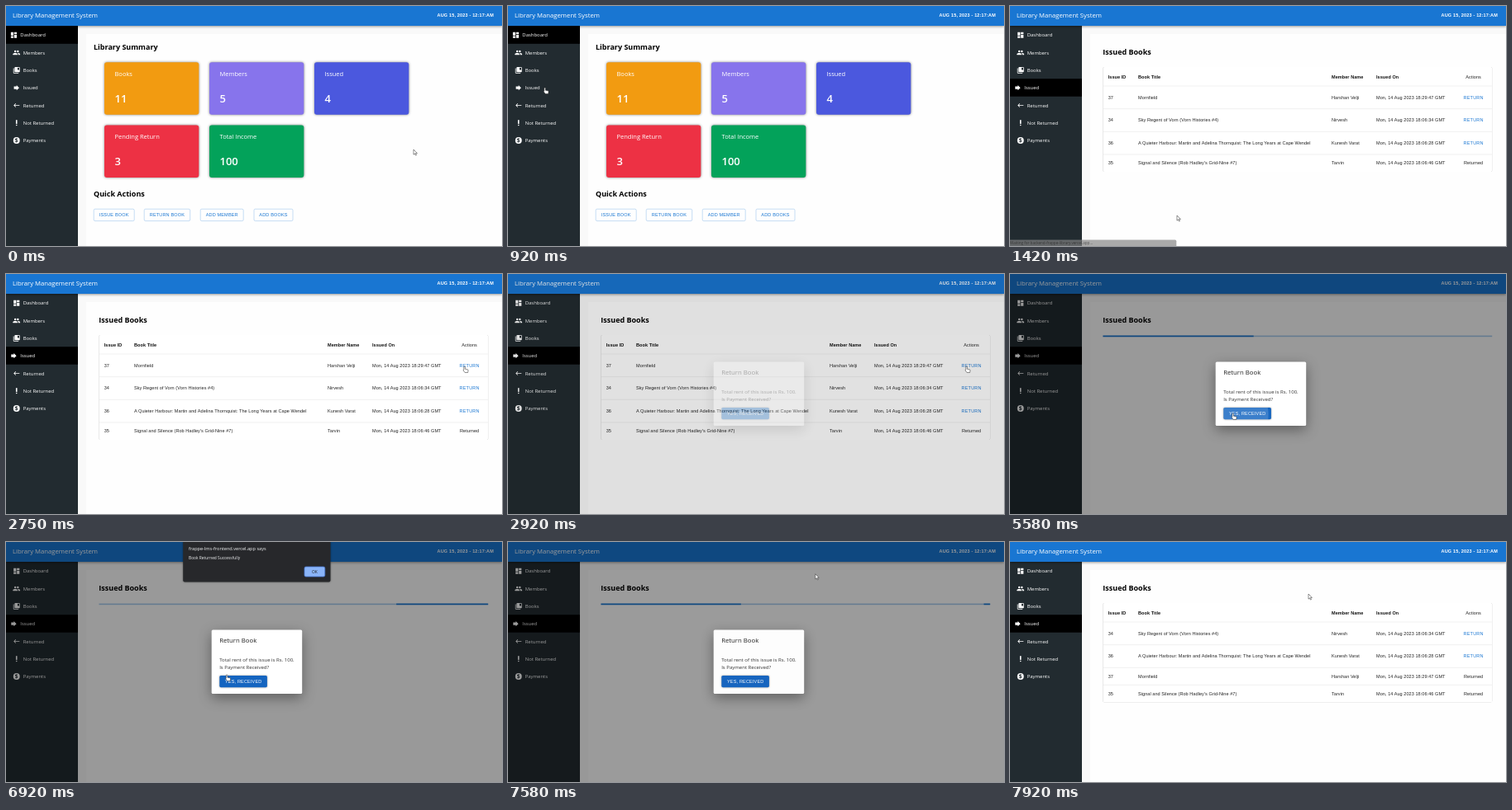
An HTML page for the animation above (8000 ms loop, 600 by 291 pixels).

```html
<!DOCTYPE html>
<html lang="en">
<head>
<meta charset="utf-8">
<title>Library Management System</title>
<style>
  html, body { margin: 0; width: 100%; height: 100%; overflow: hidden; background: #fff; }
  svg { display: block; width: 100vw; height: 100vh; }
  text { font-family: "Open Sans", "Noto Sans", sans-serif; white-space: pre; }
  .ar { font-family: "Liberation Sans", Arial, sans-serif; font-size: 5.54px; letter-spacing: .0107em; }
  .btn { letter-spacing: .0286em; }
  .b { font-weight: 700; }
  .mid { text-anchor: middle; }
  .end { text-anchor: end; }
  .h { font-size: 9px; font-weight: 700; fill: #000; }
  .bar { filter: drop-shadow(0 1px 1.5px rgba(0,0,0,.4)); }
  .card { filter: drop-shadow(0 .6px 1.8px rgba(0,0,0,.5)); }
  .paper { filter: drop-shadow(0 .5px .6px rgba(0,0,0,.35)); }
  .dialog { filter: drop-shadow(0 5px 8px rgba(0,0,0,.38)); }
  .raised { filter: drop-shadow(0 .8px .9px rgba(0,0,0,.4)); }
</style>
</head>
<body>
<svg id="stage" viewBox="0 0 600 291" preserveAspectRatio="none"></svg>
<script>
const LOOP = 8000, FPS = 12;
const OPEN_PAGE = 1000, PAGE_READY = 1330, OPEN_DIALOG = 2850, LOAD = 5365,
      ALERT = 6515, ALERT_OFF = 7480, CLOSE_DIALOG = 7580, RELOADED = 7740;
const BLUE = '#1976d2';

const rect = (x, y, w, h, fill, more = '') =>
  `<rect x="${x}" y="${y}" width="${w}" height="${h}" fill="${fill}" ${more}/>`;
const text = (x, y, s, size, fill, more = '') =>
  `<text x="${x}" y="${y}" ${size ? `font-size="${size}"` : ''} fill="${fill}" ${more}>${s}</text>`;
const arial = (x, y, s, cls = '', fill = '#222') => text(x, y, s, 0, fill, `class="ar ${cls}"`);
const group = (id, body, more = '') => `<g id="${id}" ${more}>${body}</g>`;

// Sidebar
const person = (x) => `<circle cx="${x}" cy="8" r="3"/><path d="M${x - 7} 19v-2.5c0-2.3 4.7-3.5 7-3.5s7 1.2 7 3.5V19z"/>`;
const menu = [
  ['Dashboard', '<path d="M3 13h8V3H3zm0 8h8v-6H3zm10 0h8V11h-8zm0-18v6h8V3z"/>'],
  ['Members', person(8) + '<circle cx="16" cy="8" r="3"/><path d="M15 13c1.200.8 2 2 2 3.500V19h6v-2.500c0-2.300-4.700-3.500-8-3.500z"/>'],
  ['Books', '<path d="M4 6H2v14c0 1.100.9 2 2 2h14v-2H4zM20 2H8c-1.100 0-2 .9-2 2v12c0 1.100.9 2 2 2h12c1.100 0 2-.9 2-2V4c0-1.100-.9-2-2-2zm0 10l-2.500-1.500L15 12V4h5z"/>'],
  ['Issued', '<path d="M12 8V4l8 8-8 8v-4H4V8z"/>'],
  ['Returned', '<path d="M21 11H6.800l3.600-3.600L9 6l-6 6 6 6 1.400-1.400L6.800 13H21z"/>'],
  ['Not Returned', '<circle cx="12" cy="19" r="2"/><path d="M10 3h4v12h-4z"/>'],
  ['Payments', '<circle cx="12" cy="12" r="10"/><text x="12" y="18" font-size="17" font-weight="700" fill="#222b30" text-anchor="middle">$</text>']
];
const sidebar = (active) => rect(0, 24, 87, 267, '#222b30') + menu.map(([label, icon], i) => {
  const y = 35.2 + i * 21.3, on = i === active;
  return (on ? rect(0, y - 10.9, 87, 21.5, '#000') : '') +
    `<g fill="#fff" transform="translate(${on ? 4.700 : 8} ${y - 4.700}) scale(.396)">${icon}</g>` +
    text(on ? 17.3 : 20.7, y + 2.2, label, 5.95, '#fff');
}).join('');

// Dashboard page
const cards = [['Books', 11, '#f29b11'], ['Members', 5, '#8774ec'], ['Issued', 4, '#4b58de'],
               ['Pending Return', 3, '#ed3144'], ['Total Income', 100, '#03a25a']];
const actions = [['ISSUE BOOK', 106, 49], ['RETURN BOOK', 167, 55.5], ['ADD MEMBER', 235, 52], ['ADD BOOKS', 299.8, 47]];
const dashboard = text(106, 53, 'Library Summary', 0, '#000', 'class="h"') +
  cards.map(([label, n, fill], i) => {
    const x = 119 + i % 3 * 127, y = 68.3 + Math.floor(i / 3) * 76.3;
    return rect(x, y, 114.3, 63.4, fill, 'rx="3" class="card"') +
      text(x + 12.5, y + 16.5, label, 7.5, '#fff') +
      text(x + 12.5, y + 48.2, n, 13, '#fff', 'font-weight="600"');
  }).join('') +
  text(106, 231, 'Quick Actions', 0, '#000', 'class="h"') +
  actions.map(([label, x, w]) =>
    rect(x + .2, 246.2, w, 14.4, 'none', 'rx="1.6" stroke="#8cbae8" stroke-width=".5"') +
    arial(x + w / 2 + .2, 255.4, label, 'btn mid', BLUE)).join('');

// Issued books page
const books = {
  37: ['Mornfield', 'Harshan Velji', '29:47'],
  34: ['Sky Regent of Vorn (Vorn Histories #4)', 'Nirvesh', '06:34'],
  36: ['A Quieter Harbour: Martin and Adelina Thornquist: The Long Years at Cape Wendel', 'Kunesh Varat', '06:28'],
  35: ['Signal and Silence (Rob Hadley\'s Grid-Nine #7)', 'Tarvin', '06:46']
};
const cols = [118.7, 155, 389, 443];
function table(ids, open) {
  let y = 97, body = '';
  ids.forEach((id, i) => {
    const h = i < open ? 27.65 : 21, base = y + h / 2 + 2;
    const [title, who, at] = books[id];
    body += `<path d="M112.500 ${y}H583" stroke="#e0e0e0" stroke-width=".5"/>`;
    [id, title, who, `Mon, 14 Aug 2023 18:${at} GMT`].forEach((s, c) => body += arial(cols[c], base, s));
    body += i < open ? arial(560.6, base, 'RETURN', 'btn mid', BLUE) : arial(560.6, base, 'Returned', 'mid');
    y += h;
  });
  const head = ['Issue ID', 'Book Title', 'Member Name', 'Issued On']
    .map((s, c) => arial(cols[c], 87.600, s, 'b', '#111')).join('');
  return rect(112.5, 74, 470.7, y - 74, '#fff', 'rx="1.6" class="paper"') + head +
    arial(560.6, 87.6, 'Actions', 'mid') + body;
}
const progress = rect(112.5, 74.6, 470.7, 1.6, '#a7caed') +
  ['p1', 'p2'].map(id => rect(112.5, 74.6, 0, 1.6, BLUE, `id="${id}"`)).join('');
const issued = text(112.3, 59, 'Issued Books', 0, '#000', 'class="h"') +
  group('before', rect(542, 103, 37, 15, BLUE, 'id="hover" opacity=".05" rx="1.6"') + table([37, 34, 36, 35], 3)) +
  group('after', table([34, 36, 37, 35], 2)) +
  group('loading', progress);

// Overlays
const dialog = rect(248.7, 106.5, 109.5, 77.5, '#fff', 'rx="1.6" class="dialog"') +
  text(258.2, 122, 'Return Book', 7.75, '#222') +
  rect(334, 138, 15.3, 9, '#1f5cc6', 'id="mark"') +
  text(258.2, 145.2, 'Total rent of this issue is Rs<tspan id="picked">. 100.</tspan>', 6, '#333') +
  text(258.2, 154.1, 'Is Payment Received?', 6, '#333') +
  rect(258.3, 162, 57.6, 14.2, BLUE, 'rx="1.6" class="raised" id="yes"') +
  '<clipPath id="btnClip"><rect x="258.300" y="162" width="57.600" height="14.200" rx="1.600"/></clipPath>' +
  '<circle id="ripple" cx="271" cy="170" fill="#fff" clip-path="url(#btnClip)"/>' +
  arial(287.2, 171.1, 'YES, RECEIVED', 'btn mid', '#fff');
const alertBox = rect(214.2, -4, 178.3, 52.4, '#27282b', 'rx="2" class="raised"') +
  text(221, 10, 'frappe-lms-frontend.vercel.app says', 5.58, '#f1f3f4') +
  text(221, 21, 'Book Returned Successfully', 4.85, '#f1f3f4') +
  rect(361, 30, 24.8, 12, '#8ab4f8', 'rx="1.8" stroke="#4a78d0" stroke-width=".8"') +
  text(373.4, 37.8, 'OK', 4.9, '#202124', 'class="mid"');
const status = '<path d="M0 283.500H199.500q1.800 0 1.800 1.800V291H0z" fill="#858585" opacity=".8"/>' +
  text(0, 289.4, 'Waiting for backend-frappe-library.vercel.app...', 4.6, '#3a3a3a');

document.getElementById('stage').innerHTML =
  rect(0, 0, 600, 291, '#f9f9f9') + rect(97, 34, 503, 257, '#fefefe') +
  group('home', dashboard + sidebar(0)) +
  group('list', issued + sidebar(3)) +
  rect(0, 0, 600, 24, BLUE, 'class="bar"') +
  text(8, 14.1, 'Library Management System', 7.72, '#fff') +
  arial(590, 13.2, 'AUG 15, 2023 - 12:17:AM', 'b btn end', '#fff') +
  group('status', status) +
  rect(0, 0, 600, 291, '#000', 'id="shade"') +
  group('dialog', dialog) + group('alert', alertBox) +
  group('arrow', '<path d="M0 0V6.200L1.500 4.900 2.500 7.100 3.500 6.700 2.500 4.500H4.400Z"/>', 'fill="#fff" stroke="#222" stroke-width=".5"') +
  group('hand', '<path d="M-.4 0c.5 0 .8.3.8.8v2.400l2.900.6c.6.1.9.5.8 1.100l-.4 2.600H.2L-1.800 5c-.3-.5.2-1 .6-.7V.8c0-.5.300-.8.8-.8z"/>', 'fill="#fff" stroke="#222" stroke-width=".5"');

const el = {};
document.querySelectorAll('[id]').forEach(e => el[e.id] = e);
const show = (id, on) => el[id].setAttribute('display', on ? 'inline' : 'none');
const set = (id, attr, v) => el[id].setAttribute(attr, v);
const clamp = (v) => Math.min(1, Math.max(0, v));
const ramp = (t, a, b) => clamp((t - a) / (b - a));
const smooth = (p) => p * p * (3 - 2 * p);

function bezier(x, x1, y1, x2, y2) {
  const at = (s, a, b) => 3 * (1 - s) * (1 - s) * s * a + 3 * (1 - s) * s * s * b + s * s * s;
  let lo = 0, hi = 1;
  for (let i = 0; i < 24; i++) {
    const m = (lo + hi) / 2;
    if (at(m, x1, x2) < x) lo = m; else hi = m;
  }
  return at(lo, y1, y2);
}

// Two bars chase each other across the track, 2.1 s per round
function placeBar(id, left, right) {
  const a = clamp(left), b = clamp(1 - right);
  set(id, 'x', 112.5 + a * 470.7);
  set(id, 'width', Math.max(0, b - a) * 470.7);
}
function runProgress(ms) {
  const phase = (d) => ms < d ? 0 : clamp((ms - d) % 2100 / 1260);
  const p = bezier(phase(0), .65, .815, .735, .395);
  const q = bezier(phase(1150), .165, .84, .44, 1);
  placeBar('p1', -.35 + 1.35 * p, 1 - 1.9 * p);
  placeBar('p2', -2 + 3.07 * q, 1 - 1.08 * q);
}

const path = [
  [0, 493, 174], [170, 493, 174], [830, 45, 99], [1000, 45, 99], [1420, 202, 254],
  [1670, 330, 186], [2350, 555, 112], [2920, 555, 112], [3420, 335, 143], [3850, 349, 142],
  [4250, 349, 142], [4850, 270, 169], [5750, 270, 169], [6300, 267.5, 161], [6950, 267.5, 161],
  [7330, 373, 36], [7500, 373, 36], [7920, 361, 63], [LOOP, 361, 63]
];
function pointer(t) {
  const i = path.findIndex(k => k[0] > t), a = path[i - 1], b = path[i];
  const p = smooth(ramp(t, a[0], b[0]));
  return [a[1] + (b[1] - a[1]) * p, a[2] + (b[2] - a[2]) * p];
}

function draw(t) {
  const [x, y] = pointer(t);
  const overReturn = t > 2250 && t < 2950, overYes = t > 4740 && t < 7000;
  const hand = x < 80 || overReturn || overYes;
  show('hand', hand);
  show('arrow', !hand);
  set(hand ? 'hand' : 'arrow', 'transform', `translate(${x} ${y})`);

  show('home', t < OPEN_PAGE);
  show('list', t >= OPEN_PAGE);
  const reading = t >= LOAD && t < RELOADED;
  show('before', t >= PAGE_READY && t < LOAD);
  show('after', t >= RELOADED);
  show('loading', t < PAGE_READY || reading);
  show('hover', overReturn);
  // The open alert holds the bars still
  runProgress(t < LOAD ? t - OPEN_PAGE : Math.min(t, ALERT) - LOAD + Math.max(0, t - ALERT_OFF));
  set('status', 'opacity', ramp(t, OPEN_PAGE, 1100) * (1 - ramp(t, 1380, 1640)));

  const open = ramp(t, OPEN_DIALOG, OPEN_DIALOG + 225) - ramp(t, CLOSE_DIALOG, CLOSE_DIALOG + 195);
  set('shade', 'opacity', open * .4);
  set('dialog', 'opacity', open);
  const picked = t >= 3500 && t < 4320;
  show('mark', picked);
  set('mark', 'width', 15.3 * ramp(t, 3420, 3750));
  set('picked', 'fill', picked ? '#fff' : '#333');
  set('yes', 'fill', overYes || t >= 7000 ? '#1565c0' : BLUE);
  set('ripple', 'r', 50 * ramp(t, 5250, 5650));
  set('ripple', 'opacity', .2 * (1 - ramp(t, 5500, 6000)));
  show('alert', t >= ALERT && t < ALERT_OFF);
}

function tick(now) {
  const step = Math.floor((now % LOOP + 4) * FPS / 1000);
  draw(step * 1000 / FPS % LOOP);
  requestAnimationFrame(tick);
}
draw(0);
requestAnimationFrame(tick);
</script>
</body>
</html>
```
